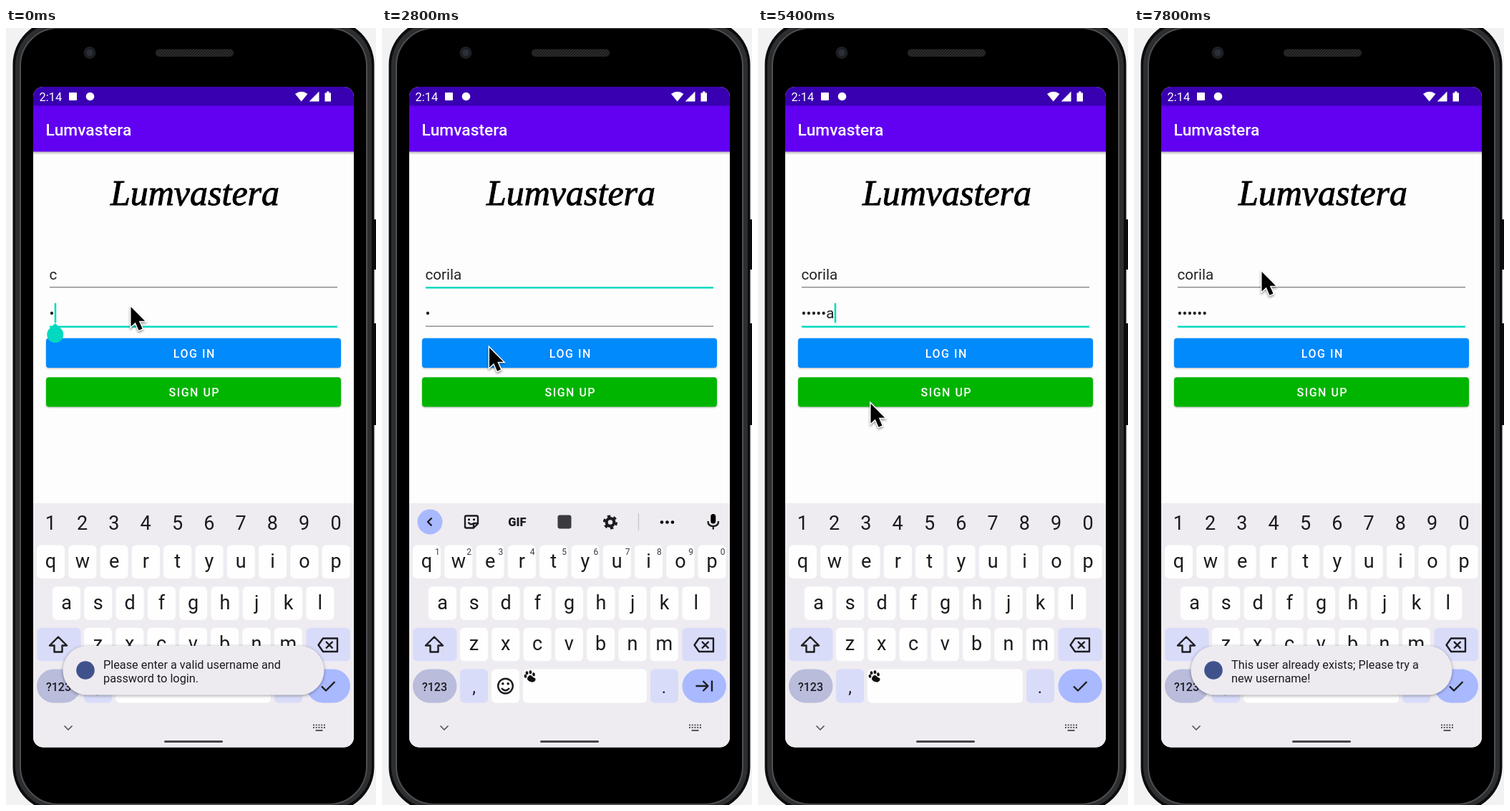
An HTML page that plays this animation: 517x1084 px, repeating every 8000 ms.

```html
<!DOCTYPE html>
<html lang="en">
<head>
<meta charset="utf-8">
<title>Sign-in screen</title>
<style>
  html, body { margin: 0; width: 100%; height: 100%; overflow: hidden; background: #f2f2f3; }
  svg { display: block; width: 100%; height: 100%; }
  text { font-family: Roboto, sans-serif; fill: #1b1b1f; white-space: pre; }
  .mid { text-anchor: middle; }
  .key { font-size: 27px; text-anchor: middle; }
  .hint { font-size: 12px; text-anchor: middle; fill: #3c3b40; }
  .white { fill: #fff; }
  .line { fill: none; stroke: #1d1d21; stroke-width: 2.4; stroke-linejoin: round; }
  .btn { filter: drop-shadow(0 1.5px 1px rgba(0, 0, 0, .28)); }
  .btn-text { font-size: 16px; font-weight: 500; letter-spacing: 1.5px; fill: #fff; text-anchor: middle; }
  .brand { font: italic 50px 'Liberation Serif', serif; fill: #000; stroke: #000; stroke-width: .9; }
  .field { font-size: 20.6px; fill: #212121; }
  .toast-box { fill: #eeebf0; filter: drop-shadow(0 1.5px 2px rgba(0, 0, 0, .38)); }
  .toast-text { font-size: 16.3px; }
  .teal { fill: #03d9bf; }
  #toast { transform-origin: 262px 896.5px; }
  #pointer { filter: drop-shadow(0 2px 1.5px rgba(0, 0, 0, .4)); }
</style>
</head>
<body>
<svg viewBox="0 0 517 1084" preserveAspectRatio="none">
  <defs>
    <linearGradient id="fade" x2="0" y2="1">
      <stop offset="0" stop-color="#000" stop-opacity=".3"/>
      <stop offset="1" stop-color="#000" stop-opacity="0"/>
    </linearGradient>
    <clipPath id="glass"><rect x="38" y="82" width="448" height="921.5" rx="14"/></clipPath>
    <pattern id="mesh" width="4" height="4" patternUnits="userSpaceOnUse">
      <rect width="4" height="4" fill="#1d1d1d"/>
      <path d="M0 4L4 0" stroke="#383838"/>
    </pattern>
  </defs>

  <!-- phone body -->
  <path d="M515.5 267v70M515.5 412v142" stroke="#0c0c0d" stroke-width="3"/>
  <rect x="9.5" y="-11" width="505" height="1104" rx="62" fill="#0b0c0d"/>
  <rect x="13" y="-7" width="498" height="1096" rx="59" fill="#2c2e30"/>
  <rect x="20" y="0" width="484" height="1083" rx="53" fill="#000" stroke="#4c4e51" stroke-width="2"/>
  <circle cx="117" cy="34.5" r="8.5" fill="#1c1e21"/>
  <circle cx="117" cy="34.5" r="4.5" fill="#2b303b"/>
  <rect x="209" y="29.5" width="109" height="10.5" rx="5" fill="url(#mesh)"/>

  <g clip-path="url(#glass)">
    <rect x="38" y="82" width="448" height="922" fill="#fdfdfd"/>
    <rect x="38" y="172" width="448" height="5" fill="url(#fade)"/>
    <rect x="38" y="108" width="448" height="64.5" fill="#6200f2"/>
    <rect x="38" y="82" width="448" height="26.5" fill="#3900b1"/>

    <!-- status bar -->
    <text class="white" x="46.5" y="101.5" font-size="16.5">2:14</text>
    <rect class="white" x="88" y="90" width="11" height="11" rx="1"/>
    <circle class="white" cx="117.5" cy="95.5" r="5.8"/>
    <path class="white" d="M404 92q8.7-6.5 17.4 0L412.7 102.5zM423.5 102.5h14v-14z"/>
    <path class="white" d="M445.5 90.5h2.5v-2h3.5v2h2.5v12h-8.5z"/>

    <text class="white" x="55.5" y="149.8" font-size="22.8" font-weight="500">Lumvastera</text>
    <text class="mid brand" x="264" y="246.5">Lumvastera</text>

    <!-- form -->
    <rect id="userLine" x="61" width="402"/>
    <rect id="passLine" x="61" width="402"/>
    <text id="user" class="field" x="60.5" y="351"></text>
    <text id="pass" class="field" x="60.5" y="405.3"></text>
    <rect id="loginBtn" class="btn" x="56" y="432.7" width="412" height="41.3" rx="4"/>
    <text class="btn-text" x="263.3" y="459.7">LOG IN</text>
    <rect id="signBtn" class="btn" x="56" y="487.2" width="412" height="41.3" rx="4"/>
    <text class="btn-text" x="263.3" y="514.3">SIGN UP</text>
    <rect id="caret" class="teal" width="2.5" height="27.5"/>
    <path id="handle" class="teal" d="M0-15.5L8.1-8.1A11.5 11.5 0 1 1-8.1-8.1z"/>

    <!-- keyboard -->
    <rect x="38" y="663" width="448" height="341" fill="#eeecf1"/>
    <g id="keys"></g>
    <path class="line" d="M73 849.5l12 12h-6.500v9h-11v-9h-6.500zM443 851.500h20v18.500h-20l-6.500-9.250zM447 856l9.500 9.500m0-9.500l-9.500 9.500"/>
    <text class="mid" x="73.5" y="924.5" font-size="16" font-weight="500">?123</text>
    <text class="key" x="128.5" y="928" style="font-size:24px">,</text>
    <text class="key" x="394" y="928" style="font-size:24px">.</text>

    <g id="digits">
      <rect x="153" y="894.5" width="217" height="47" rx="6" fill="#fefefe"/>
      <path class="line" d="M441 918.5l6 6 12.500-12.500"/>
    </g>
    <g id="tools">
      <rect x="153" y="894.5" width="39" height="47" rx="6" fill="#fefefe"/>
      <rect x="197" y="894.5" width="173" height="47" rx="6" fill="#fefefe"/>
      <circle class="line" cx="172.5" cy="918" r="10.3"/>
      <path class="line" d="M167 921q5.500 6.500 11 0"/>
      <circle cx="168.8" cy="914.8" r="1.7"/><circle cx="176.2" cy="914.8" r="1.7"/>
      <path class="line" d="M438.500 918h17m-7-7l7 7-7 7M461 910.500v15"/>

      <circle cx="67" cy="689" r="17.5" fill="#a9b9ff"/>
      <path class="line" d="M69.500 683.500l-5.500 5.500 5.500 5.500"/>
      <path class="line" d="M118 680.500h14q2 0 2 2v9l-6 6h-10q-2 0-2-2v-13q0-2 2-2zM134 691h-6v6M120.500 689.500q3 4.500 6.500 2"/>
      <circle cx="121.5" cy="685.7" r="1.5"/><circle cx="128.5" cy="685.7" r="1.5"/>
      <text class="mid" x="189" y="694.7" font-size="16.5" font-weight="900">GIF</text>
      <rect x="245.5" y="679.5" width="19" height="19" rx="3" fill="#3a3a3f"/>
      <circle cx="319" cy="689.5" r="8.3" fill="none" stroke="#1d1d21" stroke-width="3.6" stroke-dasharray="4.35"/>
      <circle cx="319" cy="689.5" r="5.3" fill="none" stroke="#1d1d21" stroke-width="4.2"/>
      <path d="M358.5 677v24" stroke="#c8c6cc" stroke-width="1.3"/>
      <circle cx="391" cy="689.5" r="2.3"/><circle cx="398.5" cy="689.5" r="2.3"/><circle cx="406" cy="689.5" r="2.3"/>
      <rect x="459.3" y="678" width="7" height="13.5" rx="3.5"/>
      <path class="line" d="M455.500 688q0 7 7.300 7t7.300-7M462.800 695v4.500"/>
    </g>
    <g id="paw" fill="#111">
      <path d="M-4 5q-1-3 2-5t5 1q1 2 3 3t0 4q-2 2-5 1t-5-4z"/>
      <ellipse cx="-6" cy="-1" rx="1.9" ry="2.5"/><ellipse cx="-3" cy="-5" rx="1.9" ry="2.6"/>
      <ellipse cx="2" cy="-5" rx="1.9" ry="2.6"/><ellipse cx="5.8" cy="-1" rx="1.9" ry="2.5"/>
    </g>

    <path class="line" d="M81.500 973.500l5.500 5.500 5.500-5.500" style="stroke:#55545a;stroke-width:1.7"/>
    <path d="M429 972.5h17M429 976h17" stroke="#55545a" stroke-width="2" stroke-dasharray="2 1.75"/>
    <path d="M432.5 980h10" stroke="#55545a" stroke-width="2"/>
    <rect x="221" y="994" width="82" height="3" rx="1.5" fill="#46454a"/>

    <g id="toast">
      <rect class="toast-box" x="79.5" y="862" width="365" height="68.5" rx="34"/>
      <g id="message">
        <circle cx="111" cy="896" r="12.8" fill="#40528c"/>
        <text id="line1" class="toast-text" x="136" y="893.5"></text>
        <text id="line2" class="toast-text" x="136" y="912.5"></text>
      </g>
    </g>
  </g>

  <path id="pointer" d="M0 0v27.500l6.300-5.800 4.700 11 5-2.200-4.700-10.700h8.300z" fill="#000" stroke="#fff" stroke-width="2.8" paint-order="stroke"/>
</svg>

<script>
const LOOP = 8000, STEP = 200, PITCH = 44.3;
const NAME = 'corila';
const $ = id => document.getElementById(id);
const set = (id, attrs) => { for (const k in attrs) $(id).setAttribute(k, attrs[k]); };
const show = (id, on) => { $(id).style.display = on ? '' : 'none'; };

function add(parent, tag, attrs, text = '') {
  const el = document.createElementNS('http://www.w3.org/2000/svg', tag);
  for (const k in attrs) el.setAttribute(k, attrs[k]);
  el.textContent = text;
  $(parent).append(el);
}

function key(x, y, width, fill = '#fefefe', rx = 6, height = 46.5) {
  add('keys', 'rect', { x, y, width, height, rx, fill });
}

function row(letters, x, y) {
  [...letters].forEach((c, i) => {
    key(x + i * PITCH, y, 39);
    add('keys', 'text', { class: 'key', x: x + 19.5 + i * PITCH, y: y + 31.5 }, c);
  });
}

function buildKeyboard() {
  row('qwertyuiop', 43, 721.5);
  row('asdfghjkl', 65, 779.3);
  row('zxcvbnm', 109, 836.7);
  key(43, 836.7, 61.5, '#d9dcf9');
  key(419.5, 836.7, 61.5, '#d9dcf9');
  key(43, 894.5, 61.5, '#b9bcdb', 23.5, 47);
  key(419.5, 894.5, 61.5, '#a9b9ff', 23.5, 47);
  key(109, 894.5, 39, '#d9dcf9', 6, 47);
  key(375, 894.5, 39, '#d9dcf9', 6, 47);
  [...'1234567890'].forEach((c, i) => {
    add('digits', 'text', { class: 'key', x: 62.3 + i * PITCH, y: 700 }, c);
    add('tools', 'text', { class: 'hint', x: 77.3 + i * PITCH, y: 735 }, c);
  });
}

// time, x, y of the pointer tip
const PATH = [
  [0, 174.5, 389], [200, 174.5, 389], [800, 136.5, 346], [1200, 136.5, 346], [2000, 127.5, 403],
  [2800, 150, 446], [3300, 150, 446], [3800, 157.5, 396], [4200, 157.5, 396], [5200, 157.5, 524],
  [5600, 157.5, 524], [6200, 159.5, 507], [6800, 159.5, 507], [7800, 178.5, 340], [8000, 178.5, 340]
];

function pointerAt(t) {
  const i = PATH.findIndex(p => p[0] > t);
  const [a, b] = [PATH[i - 1], PATH[i]];
  const u = (t - a[0]) / (b[0] - a[0]);
  const e = u * u * (3 - 2 * u);
  return [a[1] + (b[1] - a[1]) * e, a[2] + (b[2] - a[2]) * e];
}

const INVALID = ['Please enter a valid username and', 'password to login.'];
const TAKEN = ['This user already exists; Please try a', 'new username!'];
// start, end, lines
const TOASTS = [[-STEP, 1600, INVALID], [3200, 5200, INVALID], [6400, LOOP + STEP, TAKEN]];

const within = (t, a, b) => t >= a && t < b;
const typed = (t, start) => Math.max(1, Math.min(NAME.length, 1 + Math.floor((t - start) / STEP)));

function drawForm(t) {
  const onUser = within(t, 800, 4000);
  const n = typed(t, 1000), m = typed(t, 4200);
  $('user').textContent = NAME.slice(0, n);
  const peek = m > 1 && t < 6800;
  $('pass').textContent = '•'.repeat(peek ? m - 1 : m) + (peek ? NAME[m - 1] : '');

  const underline = on => on ? { height: 2.5, fill: '#03d9bf' } : { height: 1.2, fill: '#777' };
  set('userLine', { y: 361, ...underline(onUser) });
  set('passLine', { y: 415.5, ...underline(!onUser) });

  // the caret restarts its blink after each edit or tap
  const lastEdit = t < 800 ? 0 : t < 1200 ? 800 : t < 4000 ? Math.min(t, 2000)
    : t < 4400 ? 4000 : Math.min(t, 5200);
  const x = 60.8 + $(onUser ? 'user' : 'pass').getComputedTextLength();
  set('caret', { x, y: onUser ? 329.5 : 383.8 });
  show('caret', (t - lastEdit) % 1000 < 500);
  set('handle', { transform: `translate(${x + 1} ${onUser ? 372.5 : 427.5})` });
  show('handle', t < 1200 || within(t, 4000, 4400));

  set('loginBtn', { fill: within(t, 3000, 3400) ? '#2f9afc' : '#008afc' });
  set('signBtn', { fill: within(t, 6200, 6600) ? '#33bf00' : '#00b500' });

  show('tools', onUser);
  show('digits', !onUser);
  set('paw', { transform: `translate(${onUser ? 206.5 : 162.5} 904) rotate(-12)` });
}

function drawToast(t) {
  const toast = TOASTS.find(([a, b]) => within(t, a, b));
  show('toast', toast);
  if (!toast) return;
  const [start, end, lines] = toast;
  const fading = t === start || t === end - STEP;
  $('toast').style.transform = `scale(${fading ? .988 : 1})`;
  $('message').style.opacity = fading ? .45 : 1;
  $('line1').textContent = lines[0];
  $('line2').textContent = lines[1];
}

function frame() {
  const t = Math.floor(performance.now() % LOOP / STEP) * STEP;
  drawForm(t);
  drawToast(t);
  const [x, y] = pointerAt(t);
  set('pointer', { transform: `translate(${x} ${y})` });
  requestAnimationFrame(frame);
}

buildKeyboard();
frame();
</script>
</body>
</html>
```
